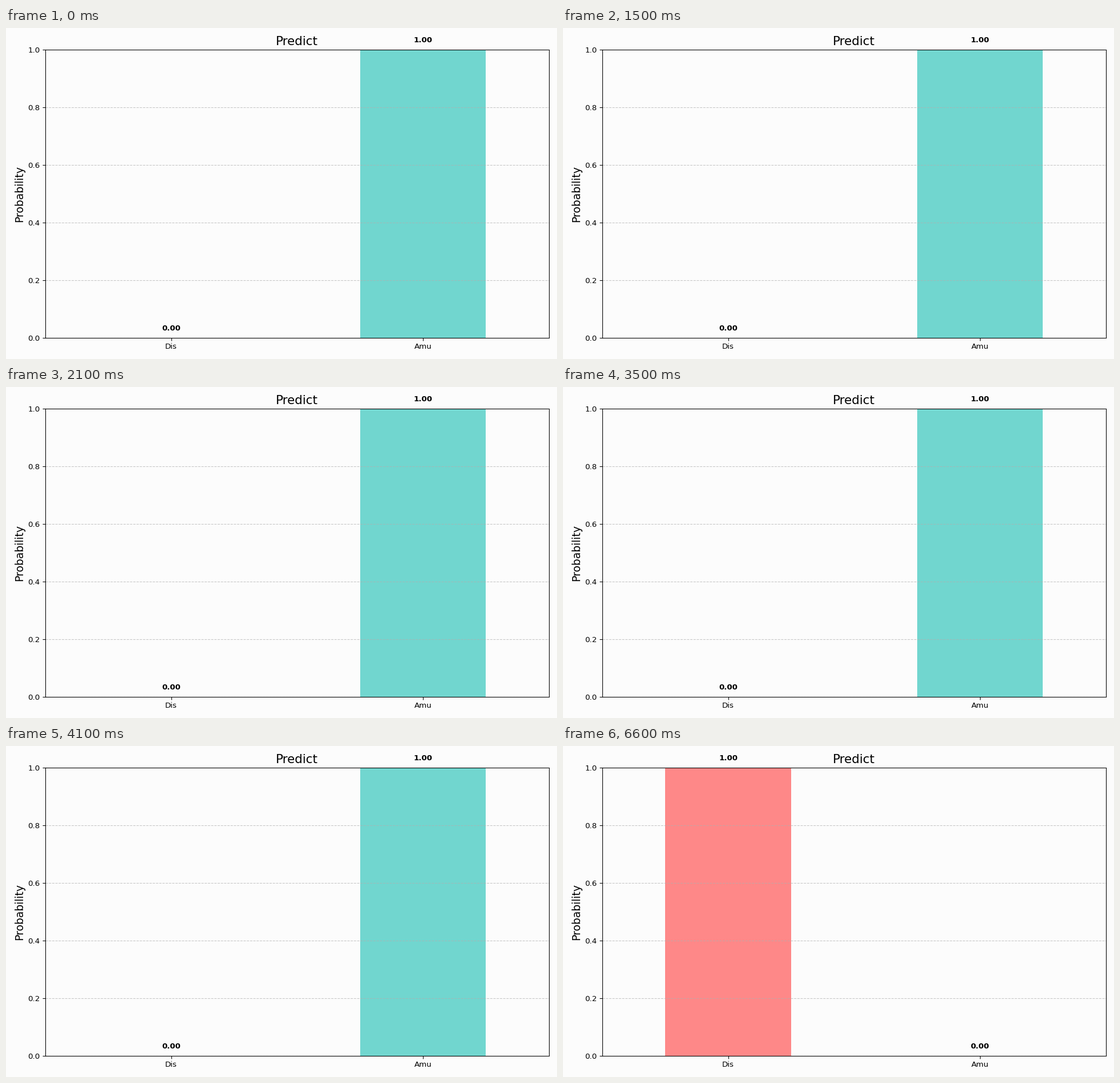
Write a matplotlib script that moves like this. It is 966 by 580 pixels and loops after 8000 ms.

```python
import matplotlib.pyplot as plt
from matplotlib.animation import FuncAnimation

W, H, DPI = 966, 580, 96.6
STEP = 500            # ms per frame
FRAMES = 16
LAST_FLIP = 5         # the prediction stays put after this many flips

BACK = "#fcfcfc"
CLASSES = ["Dis", "Amu"]
COLORS = ["#ff6b6b", "#4ecdc4"]

plt.rcParams["font.family"] = "DejaVu Sans"

fig = plt.figure(figsize=(W / DPI, H / DPI), dpi=DPI, facecolor=BACK)
left, right, top, bottom = 68.8, 951.8, 38.3, 542.6
ax = fig.add_axes([left / W, 1 - bottom / H, (right - left) / W, (bottom - top) / H],
                  facecolor=BACK)

bars = ax.bar(range(2), [0, 0], width=0.5, color=COLORS, alpha=0.8)
values = [ax.text(i, 0, "", ha="center", va="bottom", fontsize=10, fontweight="bold")
          for i in range(2)]

ax.set_xlim(-0.5, 1.5)
ax.set_ylim(0, 1)
ax.set_xticks(range(2), CLASSES)
ax.set_title("Predict", fontsize=16)
ax.set_ylabel("Probability", fontsize=14)
ax.grid(axis="y", linestyle="--", alpha=0.7)


def update(frame):
    flips = min((frame + 1) // 2, LAST_FLIP)
    winner = 1 - flips % 2
    for i, (bar, value) in enumerate(zip(bars, values)):
        p = float(i == winner)
        bar.set_height(p)
        value.set_y(p + 0.02)
        value.set_text(f"{p:.2f}")
    return [*bars, *values]


anim = FuncAnimation(fig, update, frames=FRAMES, interval=STEP,
                     repeat=True, repeat_delay=0, blit=False)
plt.show()
```
